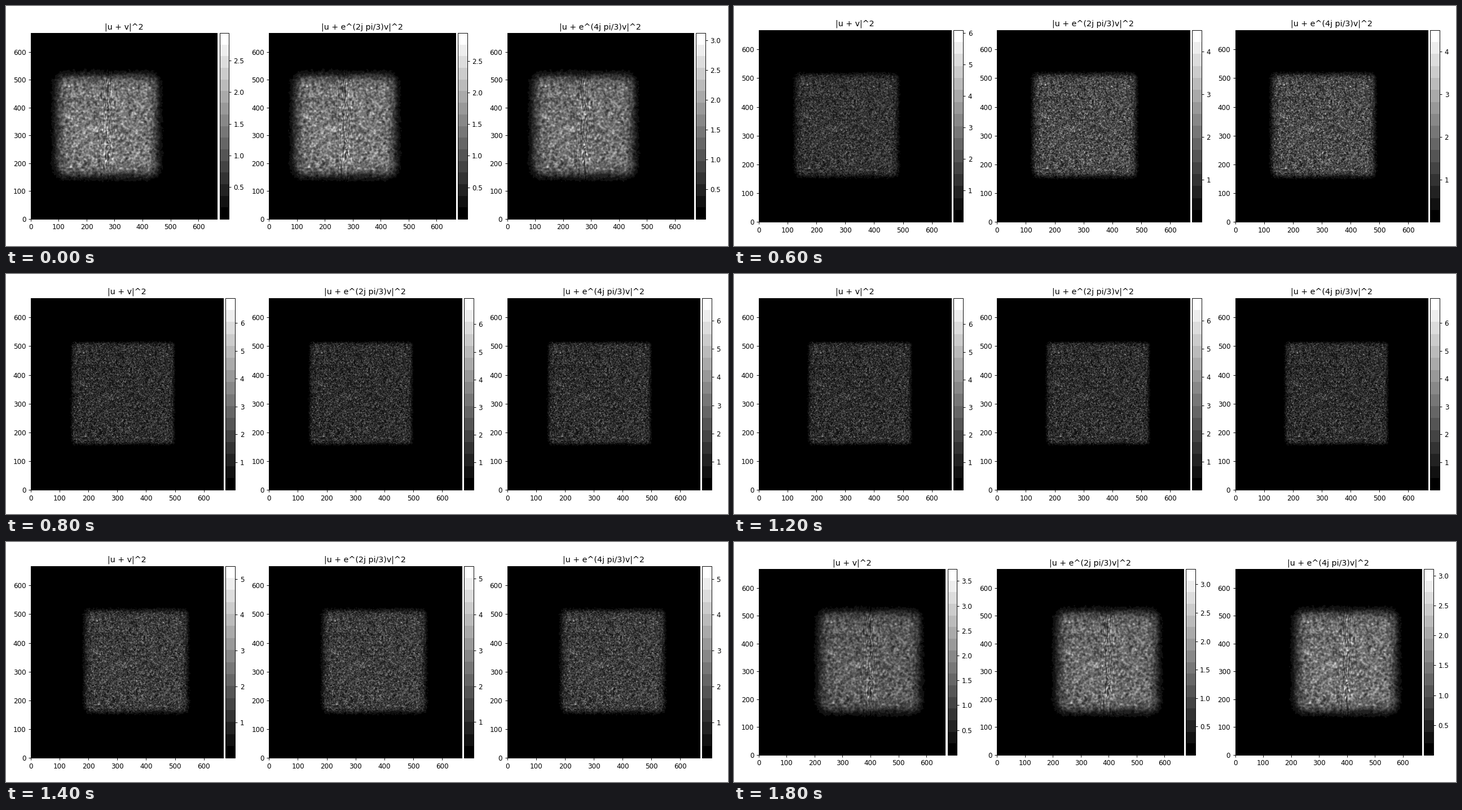
Recreate the animation shown at these times as a matplotlib script. Size 1280x427 px, loop 2 s.

```python
import numpy as np
import matplotlib.pyplot as plt
from matplotlib.animation import FuncAnimation
from mpl_toolkits.axes_grid1 import make_axes_locatable

W, H, DPI = 1280, 427, 1280 / 15
N = 668                 # samples per side of the field
HALF = 176              # half width of the lit square
MEAN = 1.42             # mean intensity inside it
MID = 4                 # step that is in focus

TITLES = ["|u + v|^2", "|u + e^(2j pi/3)v|^2", "|u + e^(4j pi/3)v|^2"]
PEAKS = [
    (2.93, 2.94, 3.12), (3.40, 3.63, 3.86), (6.10, 4.51, 4.51),
    (6.90, 6.95, 6.80), (8.92, 10.05, 8.98), (6.95, 6.80, 6.90),
    (5.36, 5.35, 5.36), (4.15, 3.95, 4.20), (3.74, 3.27, 3.11),
]

rng = np.random.default_rng(7)
grain_fft = np.fft.fft2(rng.standard_normal((N, N)))
phase_fft = np.fft.fft2(rng.standard_normal((N, N)))
freq = np.fft.fftfreq(N)
axis = np.arange(N)


def smooth(spectrum, sx, sy):
    """Unit-variance Gaussian noise with the given blur."""
    kx = np.exp(-2 * (np.pi * sx * freq) ** 2)
    ky = np.exp(-2 * (np.pi * sy * freq) ** 2)
    g = np.fft.ifft2(spectrum * kx * ky[:, None]).real
    return g / g.std()


def edge(x, w):
    return 0.5 * (1 + np.tanh(x / w))


def speckle(step):
    """Return the intensity sum, the cross-term size and its phase."""
    d = abs(step - MID)
    cx = 272 + round(15.4 * step)
    blur, soft, k = 0.8 + 0.1 * d * d, 3 + 5 * d, 3 + 1.2 * d * d

    # Wilson-Hilferty map from normal noise to gamma-distributed speckle
    g = np.roll(smooth(grain_fft, blur, blur), cx, axis=1)
    grain = np.maximum(1 - 1 / (9 * k) + g / (3 * np.sqrt(k)), 0) ** 3

    x, y = axis - cx, axis[:, None] - 335
    total = MEAN * grain * edge(HALF - abs(x), soft) * edge(HALF - abs(y), soft)
    right = edge(x, 0.6 * soft)
    cross = 0.85 * total * np.sqrt(right * (1 - right))
    wobble = np.roll(smooth(phase_fft, blur, 3 * blur), cx, axis=1)
    return total, cross, 2 * np.pi * x / (3.3 * blur) + 1.8 * wobble


fig, axes = plt.subplots(1, 3, figsize=(W / DPI, H / DPI), dpi=DPI)
cmap = plt.get_cmap("gray", 16)
images = []
for ax, title in zip(axes, TITLES):
    im = ax.imshow(np.zeros((N, N)), cmap=cmap, origin="lower", vmin=1e-4, vmax=1)
    ax.set_title(title)
    cax = make_axes_locatable(ax).append_axes("right", size="5%", pad=0.05)
    fig.colorbar(im, cax=cax)
    images.append(im)


def draw(frame):
    step = max(frame - 1, 0)    # the first step is held twice as long
    total, cross, phase = speckle(step)
    for i, im in enumerate(images):
        im.set_data(total + cross * np.cos(phase + 2 * np.pi * i / 3))
        im.set_clim(1e-4, PEAKS[step][i])
    # Lay out from the same start each time, fitted to the new tick labels
    fig.subplots_adjust(left=0.125, right=0.9, bottom=0.11, top=0.88, wspace=0.2)
    fig.tight_layout()
    return images


anim = FuncAnimation(fig, draw, frames=10, interval=200, repeat=True)
plt.show()
```
